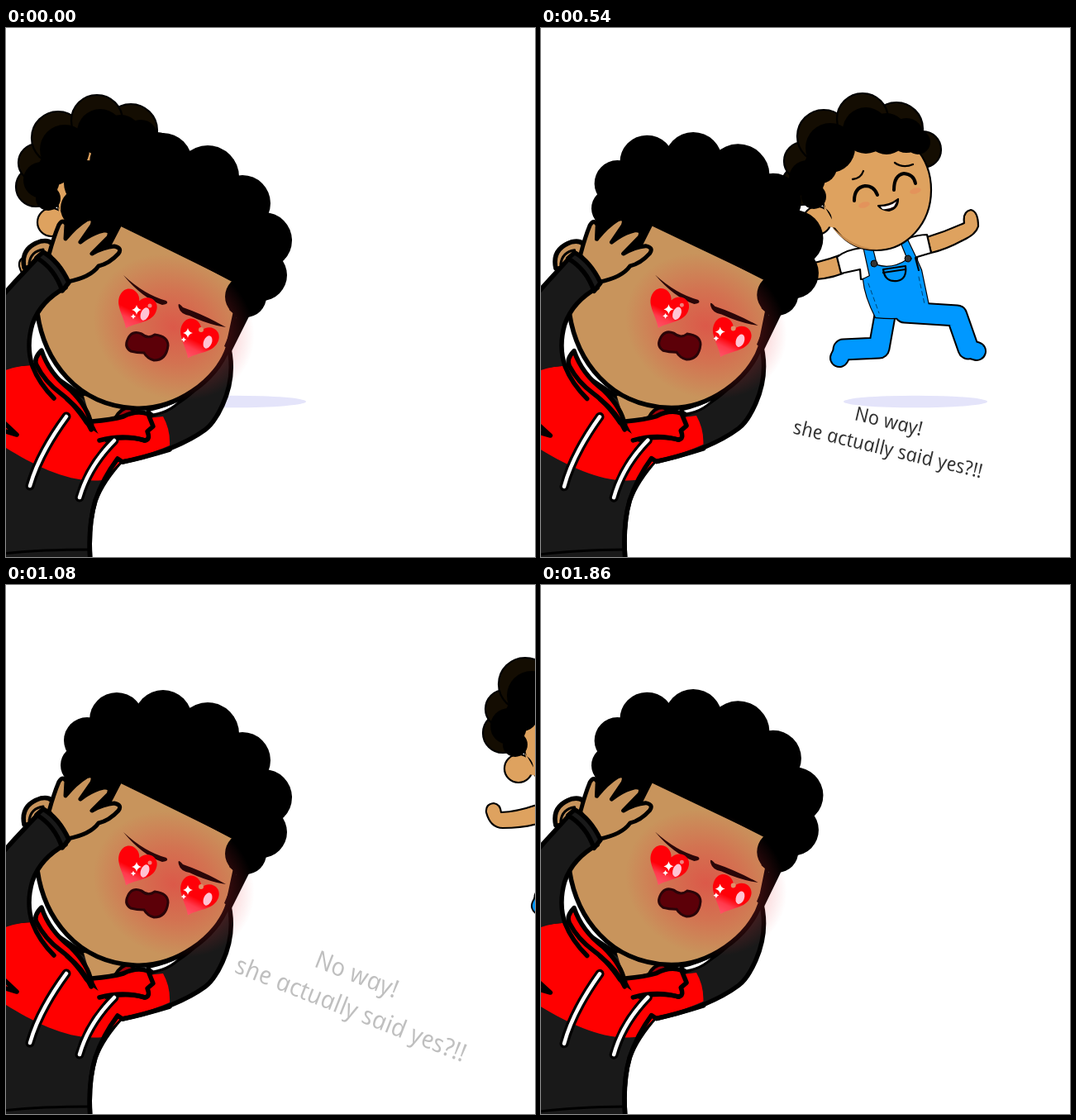
Animation of 640 by 640 pixels, one loop 1890 ms. Source, as an HTML page:

```html
<!DOCTYPE html>
<html lang="en">
<head>
<meta charset="utf-8">
<title>She said yes</title>
<style>
html, body { margin: 0; width: 100%; height: 100%; overflow: hidden; background: #fff; }
svg { display: block; width: 100vw; height: 100vh; }
.ink { stroke: #000; stroke-linejoin: round; stroke-linecap: round; }
.bold { stroke-width: 5.5; }
.thin { stroke-width: 2.2; }
.none { fill: none; }
.tan { fill: #c8945c; }
.peach { fill: #dea25f; }
.cloth { fill: #191919; }
.red { fill: #f00; }
.blue { fill: #0098ff; }
text { font: italic 22px "Open Sans", "Noto Sans", sans-serif; fill: #333; text-anchor: middle; }
</style>
</head>
<body>
<svg viewBox="0 0 640 640">
  <defs>
    <radialGradient id="glow">
      <stop offset="0" stop-color="#e8323c" stop-opacity=".6"/>
      <stop offset=".5" stop-color="#e8323c" stop-opacity=".34"/>
      <stop offset="1" stop-color="#e8323c" stop-opacity="0"/>
    </radialGradient>
    <linearGradient id="love" x1="0" y1="0" x2="0" y2="1">
      <stop offset=".5" stop-color="#ff0008"/>
      <stop offset=".72" stop-color="#ff3a4c"/>
      <stop offset="1" stop-color="#ff5468"/>
    </linearGradient>
    <path id="heart" fill="url(#love)" d="M0 25C-8 13-24 6-24-8C-24-24-5-25 0-12C5-25 24-24 24-8C24 6 8 13 0 25Z"/>
    <path id="star" fill="#fff" d="M0-6Q1-1 6 0Q1 1 0 6Q-1 1-6 0Q-1-1 0-6Z"/>
  </defs>

  <ellipse id="shadow" cy="452" ry="7.3" fill="#e4e4fa"/>

  <g id="runner">
    <g class="ink thin peach">
      <path d="M361 275Q335 285 313 286Q312 276 304 275Q294 276 295 286Q300 305 315 305Q345 305 365 297Z"/>
      <path d="M467 253Q490 246 512 236Q510 222 520 220Q529 222 529 240Q526 250 510 257Q490 268 472 272Z"/>
    </g>
    <path class="ink thin" fill="#fff" d="M358 277Q370 268 388 266L440 256Q455 250 467 250L472 272L455 277V295L400 303L387 304L386 292L363 297Z"/>
    <g id="legs"></g>
    <g class="ink thin none">
      <path class="blue" d="M414 292L441 288Q443 304 431 306Q416 308 414 292Z"/>
      <path d="M414 296L441 292"/>
      <path d="M396 309L409 345M457 301L464 334" stroke-width="1" stroke-dasharray="5 4" opacity=".55"/>
      <path d="M453 278L457 293"/>
    </g>
    <circle cx="403" cy="285" r="4" class="ink" fill="#333"/>
    <circle cx="444" cy="279" r="4" class="ink" fill="#333"/>

    <g id="curls" class="ink thin" fill="#140d02"></g>
    <ellipse class="ink thin peach" cx="406" cy="196" rx="66" ry="73"/>
    <path fill="#c68a4c" d="M351 239Q376 266 409 268Q374 271 351 239Z"/>
    <circle class="ink thin peach" cx="334" cy="233" r="17"/>
    <path class="peach" d="M342 214L358 242L346 240Z"/>
    <g id="fringe"></g>
    <g fill="#ee7a55" opacity=".35">
      <ellipse cx="391" cy="214" rx="7" ry="3.5" transform="rotate(-15 391 214)"/>
      <ellipse cx="453" cy="197" rx="7" ry="3.5" transform="rotate(-15 453 197)"/>
    </g>
    <g class="ink none">
      <path stroke-width="4" d="M379 209Q379 193 392 191Q403 191 407 202M427 196Q427 178 439 176Q451 177 453 188"/>
      <path stroke-width="2.3" d="M377 183Q387 182 390 173M428 163Q438 170 450 165"/>
    </g>
    <path id="grin" class="ink thin" fill="#240404"/>
    <path fill="#fff" d="M411 216Q422 216 430 210L427 216Q420 220 413 219Z"/>
    <ellipse id="tongue" cx="425" cy="224" rx="5" ry="3" fill="#ee1c24"/>
  </g>

  <g id="lover">
    <!-- far arm and torso -->
    <path class="ink bold cloth" d="M268 380C275 405 273 432 262 456Q252 478 241 486Q222 500 190 512Q165 520 141 525L130 500L172 470Q205 458 225 440Z"/>
    <path class="ink bold cloth" d="M-8 645V414Q12 406 38 408L100 450L175 472L141 522Q117 548 108 572Q99 602 102 645Z"/>
    <path class="red" d="M-8 414Q12 408 38 408L100 470L172 472L190 470Q199 486 198 505Q168 518 141 522L117 547C75 552 28 526-8 503Z"/>
    <path class="ink bold none" d="M198 510Q165 520 141 525L135 521Q117 545 108 572Q99 602 102 645"/>
    <path class="ink none" stroke-width="3" d="M-5 636Q40 631 102 631"/>
    <path class="ink bold none" d="M-4 476L13 492L-4 487"/>
    <path class="ink" stroke-width="3" fill="#fff" d="M171 463Q196 458 215 446Q202 464 178 468Z"/>
    <!-- hood and neck -->
    <path class="tan" d="M94 445L103 476L140 468L155 452Z"/>
    <path class="ink" fill="#a00008" stroke-width="4" d="M132 472Q138 460 150 459L160 469Z"/>
    <path class="ink bold red" d="M43 390Q33 400 37 408Q47 428 66 442Q85 456 103 486L104 476Q128 474 142 470Q158 462 172 467L178 482L171 488Q175 498 168 499Q145 492 113 500L103 480Q100 460 78 438Q52 418 43 390Z"/>
    <path class="red" d="M82 470L103 485L122 498L110 512Z"/>
    <path class="ink bold none" d="M74 449Q94 465 103 486M113 499Q142 491 168 499"/>
    <g id="cords"></g>

    <!-- head -->
    <path class="ink bold tan" d="M22 290Q17 266 42 258Q56 255 60 268L44 290Z"/>
    <path class="ink none" stroke-width="3" d="M28 285Q30 270 45 268"/>
    <path class="ink bold tan" d="M135 235L60 268Q34 308 38 345C46 402 85 456 155 460C205 463 255 426 268 388L277 346L288 310Z"/>
    <path d="M75 195L120 150L250 165L312 220L322 300L296 345L273 391L264 385L279 349L270 341L283 312L141 237L127 264L104 282L72 245Z"/>
    <g id="afro"></g>

    <!-- near arm -->
    <path class="cloth" d="M40 278L10 308L-8 328V417Q12 408 32 408Q25 385 30 362Q36 338 72 314Z"/>
    <path class="ink bold none" d="M40 276L10 308L-8 328M72 314Q42 330 32 358Q24 385 32 409Q40 430 58 448"/>
    <path class="ink tan" stroke-width="5" d="M52 274Q58 252 64 238Q69 230 73 238L72 255Q84 240 97 232Q108 228 104 239L90 259Q104 248 118 245Q128 244 124 253L104 273Q118 265 131 264Q141 266 136 273Q125 285 112 288Q102 302 74 307Z"/>
    <path class="ink bold cloth" d="M37 278Q59 291 68 318L76 308Q64 282 45 271Z"/>

    <ellipse cx="203" cy="362" rx="100" ry="86" fill="url(#glow)" transform="rotate(25 203 362)"/>

    <!-- face -->
    <g fill="#2a0608">
      <path d="M142 299Q168 323 194 330Q198 334 189 335Q165 327 142 299Z"/>
      <path d="M266 362Q240 347 214 338Q207 330 209 338Q211 346 222 348Q245 359 266 362Z"/>
    </g>
    <use href="#heart" transform="translate(156 341) rotate(26)"/>
    <use href="#heart" transform="translate(231 377) rotate(26)"/>
    <g fill="#ffc4d4">
      <ellipse cx="168" cy="346" rx="5" ry="8" transform="rotate(22 168 346)"/>
      <ellipse cx="244" cy="380" rx="5" ry="8" transform="rotate(22 244 380)"/>
      <circle cx="174" cy="336" r="2.5" fill="#f0807c"/>
      <circle cx="236" cy="365" r="3" fill="#e0906c"/>
    </g>
    <use href="#star" transform="translate(158 341)"/>
    <use href="#star" transform="translate(154 349) scale(.55)"/>
    <use href="#star" transform="translate(220 369)"/>
    <use href="#star" transform="translate(215 377) scale(.55)"/>
    <path fill="#5c0008" stroke="#2a0408" stroke-width="3" d="M147 377Q152 365 164 370Q172 377 180 371Q196 373 196 384Q194 402 179 402Q171 400 167 393Q158 393 151 391Q143 386 147 377Z"/>
  </g>

  <g id="words">
    <text y="-10" transform="skewX(12)">No way!</text>
    <text y="20.5" transform="skewX(12)">she actually said yes?!!</text>
  </g>
</svg>

<script>
const LOOP = 1890, STEP = 30;
const $ = id => document.getElementById(id);

const dots = (id, list) => {
  $(id).innerHTML = list.map(([x, y, r]) => `<circle cx="${x}" cy="${y}" r="${r}"/>`).join("");
};
dots("afro", [[90, 218, 24], [98, 188, 28], [134, 163, 33], [190, 162, 35], [244, 180, 38],
  [286, 212, 34], [312, 257, 34], [309, 299, 31], [290, 325, 25]]);
dots("curls", [[315, 190, 24], [317, 161, 23], [462, 147, 22], [342, 131, 32], [430, 122, 32], [389, 110, 31]]);
dots("fringe", [[350, 145, 30], [393, 124, 28], [418, 128, 25], [442, 130, 21], [456, 138, 15],
  [322, 182, 22], [330, 204, 15], [338, 168, 20]]);

const line = (d, color, width) =>
  `<path d="${d}" fill="none" stroke="${color}" stroke-width="${width}" stroke-linecap="round" stroke-linejoin="round"/>`;

$("cords").innerHTML = ["M73 470Q40 515 29 554", "M131 499Q100 530 89 568"]
  .map(d => line(d, "#000", 11) + line(d, "#fff", 4.5)).join("");

// Rows are [time, ...values], joined by straight lines.
const track = (rows, t) => {
  let i = 0;
  while (i < rows.length - 2 && t > rows[i + 1][0]) i++;
  const a = rows[i], b = rows[i + 1];
  const k = Math.min(1, Math.max(0, (t - a[0]) / (b[0] - a[0])));
  return a.slice(1).map((v, n) => v + (b[n + 1] - v) * k);
};

const runPath = [[0, -279, 2], [360, -124.5, 0], [540, 0, 0], [780, 113, -11], [1080, 286, -11], [1400, 480, -11]];
const shadowPath = [[0, 276, 87, 0], [360, 335, 59, 0], [540, 453, 87, 0], [780, 643, 87, -11], [1080, 860, 87, -11]];
const wordPath = [[0, 4, .85], [360, 10.2, 1], [540, 13.4, 1.08], [780, 17.7, 1.2], [1080, 21.5, 1.37], [1140, 22.3, 1.4]];
const wordFade = [[60, 0], [240, 1], [1000, 1], [1080, .31], [1116, 0]];
const stride = [[0, 0], [360, .2], [540, 1], [780, 0], [1080, 1]];

// Legs blend from tucked to stretched: hip, knee, ankle, toe.
const frontLeg = [[0, 430, 340, 497, 334, 488, 386, 497, 393], [1, 440, 344, 503, 348, 517, 388, 527, 391]];
const backLeg = [[0, 436, 345, 444, 373, 405, 396, 403, 411], [1, 416, 348, 409, 387, 366, 389, 361, 399]];
const bib = "M391 268L401 267L406 287Q425 293 444 280L435 258L443 256L453 277L460 293L469 336Q455 355 405 350Q392 325 390 304L398 300Z";

const legLines = (rows, k, color, extra) => {
  const p = track(rows, k);
  return line(`M${p.slice(0, 6)}`, color, 23 + extra) + line(`M${p.slice(4)}`, color, 20 + extra);
};

function draw(t) {
  const [x, y] = track(runPath, t);
  $("runner").setAttribute("transform", `translate(${x} ${y})`);

  const [sx, rx, sy] = track(shadowPath, t);
  $("shadow").setAttribute("cx", sx);
  $("shadow").setAttribute("rx", rx);
  $("shadow").setAttribute("transform", `translate(0 ${sy})`);

  const [k] = track(stride, t);
  const ink = "#000", blue = "#0098ff";
  $("legs").innerHTML =
    legLines(backLeg, k, ink, 4) + legLines(backLeg, k, blue, 0) +
    legLines(frontLeg, k, ink, 4) + line(bib + "", ink, 2.4) +
    legLines(frontLeg, k, blue, 0) + `<path d="${bib}" fill="${blue}"/>`;

  const low = 238 - 14 * k;
  $("grin").setAttribute("d", `M408 215Q422 215 432 207Q432 ${low - 6} 421 ${low - 8 + 5 * k}Q412 ${low - 10 + 6 * k} 408 215Z`);
  $("tongue").setAttribute("opacity", 1 - k);

  const sway = [0, -.34, -.68, -.68][Math.floor(t / STEP) % 4];
  $("lover").setAttribute("transform", `rotate(${sway} 100 640)`);

  const [angle, size] = track(wordPath, t);
  $("words").setAttribute("transform", `translate(420 495) rotate(${angle}) scale(${size})`);
  $("words").setAttribute("opacity", track(wordFade, t)[0]);
}

const start = performance.now();
function tick() {
  const t = (performance.now() - start) % LOOP;
  draw(Math.floor(t / STEP) * STEP);
  requestAnimationFrame(tick);
}
tick();
</script>
</body>
</html>
```
